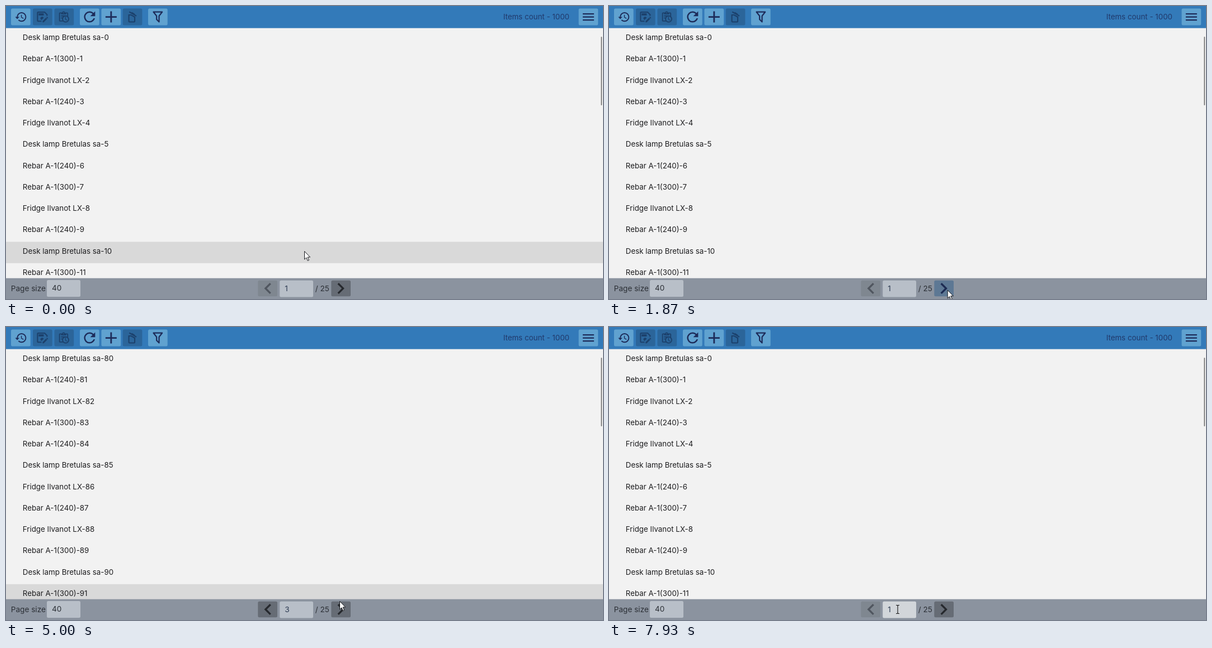
Animation of 1067 by 525 pixels, one loop 8 s. Source, as an HTML page:

```html
<!DOCTYPE html>
<html lang="en">
<head>
<meta charset="utf-8">
<title>Paged list</title>
<style>
  html, body { margin: 0; width: 100%; height: 100%; overflow: hidden; background: #f2f2f2; }
  svg { display: block; width: 100%; height: 100%; }
  text { font: 400 13.35px Inter, sans-serif; fill: #1d1d1f; white-space: pre; }
  .footer text { font-size: 13.6px; fill: #2c3036; }
</style>
</head>
<body>
<svg id="stage" viewBox="0 0 1067 525"></svg>
<script>
const FPS = 15, LOOP = 8000, ROW_TOP = 40, ROW_HEIGHT = 38.25, ROWS = 12;

const ICONS = {
  history: 'M13.5,8H12V13L16.28,15.54L17,14.33L13.5,12.25V8M13,3A9,9 0 0,0 4,12H1L4.96,16.03L9,12H6A7,7 0 0,1 13,5A7,7 0 0,1 20,12A7,7 0 0,1 13,19C11.07,19 9.32,18.21 8.06,16.94L6.64,18.36C8.27,20 10.5,21 13,21A9,9 0 0,0 22,12A9,9 0 0,0 13,3',
  save: 'M4,3H16L21,8V10.1L19,11V8.8L15.2,5H4V19H10V21H4A2,2 0 0,1 2,19V5A2,2 0 0,1 4,3M5,6H14V10H5ZM14,14.2A3,3 0 1,0 10.2,17.9ZM20.04,12.13L18.65,13.3L20.7,15.35L21.9,14ZM18.07,13.88L12,19.94V22H14.06L20.12,15.93Z',
  clipboard: 'M21 11.11V5C21 3.9 20.11 3 19 3H14.82C14.4 1.84 13.3 1 12 1S9.6 1.84 9.18 3H5C3.9 3 3 3.9 3 5V19C3 20.11 3.9 21 5 21H11.11C12.37 22.24 14.09 23 16 23C19.87 23 23 19.87 23 16C23 14.09 22.24 12.37 21 11.11M12 3A1 1 0 0 1 12 5A1 1 0 0 1 12 3M5 19V5H7V7H17V5H19V9.68C18.09 9.25 17.08 9 16 9H7V11H11.1C10.5 11.57 10.04 12.25 9.68 13H7V15H9.08C9.03 15.33 9 15.66 9 16C9 17.08 9.25 18.09 9.68 19H5M16 21A5 5 0 0 1 16 11A5 5 0 0 1 16 21M16.5 16.25L19.36 17.94L18.61 19.16L15 17V12H16.5Z',
  refresh: 'M17.65,6.35C16.2,4.9 14.21,4 12,4A8,8 0 0,0 4,12A8,8 0 0,0 12,20C15.73,20 18.84,17.45 19.73,14H17.65C16.83,16.33 14.61,18 12,18A6,6 0 0,1 6,12A6,6 0 0,1 12,6C13.66,6 15.14,6.69 16.22,7.78L13,11H20V4Z',
  plus: 'M19,13H13V19H11V13H5V11H11V5H13V11H19Z',
  bin: 'M20.37,8.91L19.37,10.64L7.24,3.64L8.24,1.91L11.28,3.66L12.64,3.29L16.97,5.79L17.34,7.16ZM6,19V7H11.07L18,11V19A2,2 0 0,1 16,21H8A2,2 0 0,1 6,19M8,19H16V12.2L10.46,9H8Z',
  filter: 'M15,19.88C15.04,20.18 14.94,20.5 14.71,20.71C14.32,21.1 13.69,21.1 13.3,20.71L9.29,16.7C9.06,16.47 8.96,16.16 9,15.87V10.75L4.21,4.62C3.87,4.19 3.95,3.56 4.38,3.22C4.57,3.08 4.78,3 5,3H19C19.22,3 19.43,3.08 19.62,3.22C20.05,3.56 20.13,4.19 19.79,4.62L15,10.75V19.88M7.04,5L11,10.06V15.58L13,17.58V10.05L16.96,5Z',
  menu: 'M3,6H21V8H3ZM3,11H21V13H3ZM3,16H21V18H3Z',
  left: 'M15.41,16.58L10.83,12L15.41,7.41L14,6L8,12L14,18Z',
  right: 'M8.59,16.58L13.17,12L8.59,7.41L10,6L16,12L10,18Z'
};

const PRODUCTS = {
  D: 'Desk lamp Bretulas sa-',
  F: 'Fridge Ilvanot LX-',
  2: 'Rebar A-1(240)-',
  3: 'Rebar A-1(300)-'
};
const PAGES = ['D3F2FD23F2D3', 'D323FDF323D2', 'D2F32DF2F3D3'];

// Tick and page shown from then on
const PAGE_CHANGES = [[0, 1], [48, 2], [67, 3], [92, 2], [110, 1]];
const CLICKS = [45, 64, 89, 107];

// Pointer path: tick, x, y
const POINTER = [
  [3, 533, 439], [8, 520, 462], [12, 485, 490], [16, 461, 500],
  [18, 491, 502], [19, 501, 503], [27, 600, 509], [30, 614, 508], [34, 604, 507],
  [54, 604, 507], [56, 596, 507], [57, 596, 507], [58, 594, 507],
  [63, 594, 507], [65, 595, 506], [66, 595, 506], [68, 605, 493],
  [70, 607, 484], [72, 604, 478], [74, 598, 486], [75, 596, 491],
  [79, 530, 505], [86, 470, 507], [111, 470, 507], [119, 516, 506]
];

const stage = document.getElementById('stage');

function add(parent, tag, attrs = {}, content = '') {
  const node = document.createElementNS('http://www.w3.org/2000/svg', tag);
  set(node, attrs);
  node.textContent = content;
  return parent.appendChild(node);
}

function set(node, attrs) {
  for (const key in attrs) node.setAttribute(key, attrs[key]);
}

const rect = (parent, x, y, width, height, fill, rx = 0) =>
  add(parent, 'rect', { x, y, width, height, fill, rx });
const label = (parent, x, y, content, attrs) => add(parent, 'text', { x, y, ...attrs }, content);

// A button whose icon is scaled to fit a 20 px square
function button(parent, icon, x, y, height, fill, ink) {
  const group = add(parent, 'g');
  const face = rect(group, x, y, 34.7, height, fill, 2.5);
  const mark = add(group, 'path', { d: ICONS[icon], fill: ink, 'fill-rule': 'evenodd' });
  const box = mark.getBBox();
  const scale = 20 / Math.max(box.width, box.height);
  const cx = x + 17.35, cy = y + height / 2;
  set(mark, {
    transform: `translate(${cx} ${cy}) scale(${scale}) ` +
      `translate(${-box.x - box.width / 2} ${-box.y - box.height / 2})`
  });
  return { group, face, mark, x, cx, cy };
}

const highlight = rect(stage, 0, 0, 1067, ROW_HEIGHT, '#d9d9d9');
const rows = Array.from({ length: ROWS }, (_, i) =>
  label(stage, 29.8, 61 + i * ROW_HEIGHT, ''));
rect(stage, 1063.4, 55, 1.8, 123, '#777', 0.9);

rect(stage, 0, 0, 1067, 39.6, '#337ab9');
[['history', 9], ['save', 48, true], ['clipboard', 86.5, true], ['refresh', 132],
 ['plus', 170.5], ['bin', 208.7, true], ['filter', 254], ['menu', 1023.5]]
  .forEach(([icon, x, disabled]) => button(stage, icon, x, 4.6, 30,
    disabled ? '#2b659a' : '#60a2d0', disabled ? '#1c416c' : '#1d2c5a'));
label(stage, 1007, 24, 'Items count - 1000', { 'text-anchor': 'end', style: 'fill:#213a6c' });

const footer = add(stage, 'g', { class: 'footer' });
rect(footer, 0, 487.7, 1067, 38, '#8b939f');
label(footer, 8.8, 511, 'Page size');
rect(footer, 73, 491, 60, 30, '#b8bfc8', 2.5);
label(footer, 82, 510, '40');
const prev = button(footer, 'left', 450.3, 491.8, 28.5);
const next = button(footer, 'right', 581.3, 491.8, 28.5);
const field = rect(footer, 489.2, 491.8, 59.8, 29.8, '', 2.5);
const pageNumber = label(footer, 498.2, 511, '', { style: 'fill:#2d3b52' });
label(footer, 552.8, 511, '/ 25');

const arrow = add(stage, 'path', {
  d: 'M.5 .5V15L3.8 11.9L6.2 17.4L8.5 16.4L6.1 11H10.6Z',
  fill: '#fff', stroke: '#16181d', 'stroke-width': 1, 'stroke-linejoin': 'round'
});
const beam = add(stage, 'path', {
  d: 'M-3 -7.5H-1L0 -6.5L1 -7.5H3M0 -6.5V6.5M-3 7.5H-1L0 6.5L1 7.5H3',
  fill: 'none', stroke: '#111', 'stroke-width': 1.1
});

function pointerAt(tick) {
  const i = POINTER.findIndex(key => key[0] >= tick);
  if (i === 0) return POINTER[0].slice(1);
  const [t0, x0, y0] = POINTER[i - 1], [t1, x1, y1] = POINTER[i];
  const k = (tick - t0) / (t1 - t0);
  return [x0 + (x1 - x0) * k, y0 + (y1 - y0) * k];
}

function paintNav(nav, enabled, hovered, pressed) {
  const [face, ink] = !enabled ? ['#7f8790', '#50565f']
    : hovered ? ['#5d7894', '#1d2b52'] : ['#666c75', '#26292e'];
  nav.face.setAttribute('fill', face);
  nav.mark.setAttribute('fill', ink);
  const scale = enabled && hovered && pressed ? 0.98 : 1;
  set(nav.group, {
    transform: `translate(${nav.cx} ${nav.cy}) scale(${scale}) translate(${-nav.cx} ${-nav.cy})`
  });
}

let shownPage = 0;
function showPage(page) {
  if (page === shownPage) return;
  shownPage = page;
  rows.forEach((row, i) => {
    row.textContent = PRODUCTS[PAGES[page - 1][i]] + ((page - 1) * 40 + i);
  });
  pageNumber.textContent = page;
}

function render(time) {
  const tick = Math.floor((time % LOOP) * FPS / 1000 + 0.06);
  const page = PAGE_CHANGES.filter(change => change[0] <= tick).pop()[1];
  const pressed = CLICKS.some(click => tick >= click && tick < click + 3);
  showPage(page);

  // Hover states trail the pointer by one tick
  const [hx, hy] = pointerAt(Math.min(tick, 119) - 1);
  const over = (x, width) => hy >= 491 && hx >= x && hx < x + width;
  const row = Math.floor((hy - ROW_TOP) / ROW_HEIGHT);
  set(highlight, { y: ROW_TOP + row * ROW_HEIGHT, visibility: hy < 488 ? 'visible' : 'hidden' });

  const editing = over(489, 60);
  field.setAttribute('fill', editing ? '#d2d6da' : '#b8bfc8');
  paintNav(prev, page > 1, over(prev.x, 35), pressed);
  paintNav(next, true, over(next.x, 35), pressed);

  const [x, y] = pointerAt(Math.min(tick, 119));
  set(arrow, { transform: `translate(${x} ${y})`, visibility: editing ? 'hidden' : 'visible' });
  set(beam, { transform: `translate(${x} ${y})`, visibility: editing ? 'visible' : 'hidden' });
}

const start = performance.now();
function loop() {
  render(performance.now() - start);
  requestAnimationFrame(loop);
}
loop();
</script>
</body>
</html>
```
